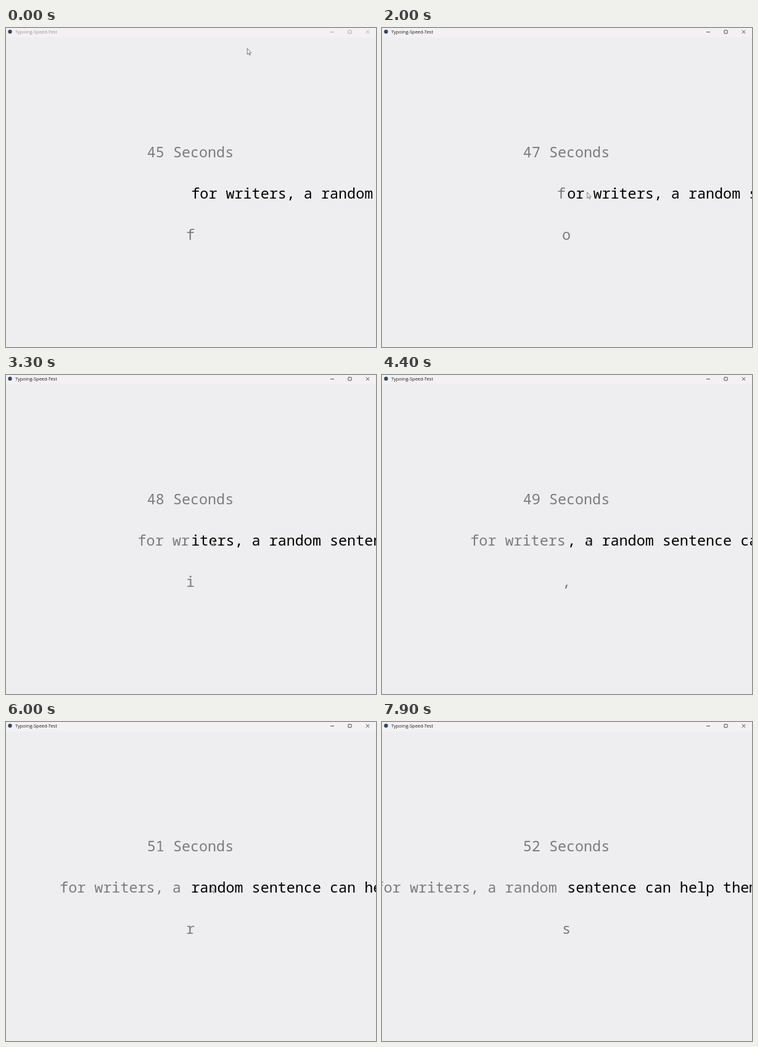
Write an HTML page that moves like this. It is 600 px wide and 518 px high and loops after 8000 ms.

```html
<!DOCTYPE html>
<html lang="en">
<head>
<meta charset="utf-8">
<title>Typing speed test</title>
<style>
  html, body { margin: 0; width: 100%; height: 100%; overflow: hidden; background: #eeedef; }
  svg { display: block; width: 100%; height: 100%; }
  .mono { font: 23.42px "Noto Sans Mono", "DejaVu Sans Mono", monospace; white-space: pre; fill: #7c7b7c; }
  .mono.todo { fill: #000; }
  .bar { font: 7.5px "Open Sans", "Noto Sans", sans-serif; }
</style>
</head>
<body>
<svg viewBox="0 0 600 518">
  <rect width="600" height="518" fill="#eeedef"/>
  <rect width="600" height="15.5" fill="#f3f1f4"/>
  <circle cx="6.5" cy="6" r="3.2" fill="#34485c"/>
  <g id="bar" class="bar">
    <text x="15" y="9.4" fill="currentColor">Typoing-Speed-Test</text>
    <g fill="none" stroke="currentColor" stroke-width=".8">
      <path d="M526 6.6h6M583.8 3.6l5.4 5.4M589.2 3.6l-5.4 5.4"/>
      <rect x="554.9" y="3.7" width="5.2" height="5.2" rx=".8"/>
    </g>
  </g>
  <text id="clock" class="mono" x="228.75" y="210"/>
  <text id="done" class="mono" y="277"/>
  <text id="todo" class="mono todo" x="300.3" y="277"/>
  <text id="key" class="mono" x="292" y="344"/>
  <path id="mouse" d="M0 0V9.6L2.2 7.6L3.6 10.9L5 10.3L3.6 7.1H6.4Z"
        fill="#fff" stroke="#3c3c3c" stroke-width=".7" stroke-linejoin="round"/>
</svg>
<script>
const LOOP = 8000, TICK = 100, ADVANCE = 14.052, DONE_END = 297.9;
const SENTENCE = "for writers, a random sentence can help them get";
// Moments at which a character is typed, in ms.
const KEYS = [2000, 2200, 2300, 2500, 3100, 3200, 3400, 3500, 3700, 3800, 4400,
              5200, 5300, 5400, 5600, 6100, 6200, 6400, 6500, 7500, 7700, 7900];
const $ = id => document.getElementById(id);
const bar = $("bar"), clock = $("clock"), done = $("done"),
      todo = $("todo"), key = $("key"), mouse = $("mouse");

const ease = p => p * p * (3 - 2 * p);
const ramp = (t, from, to) => ease(Math.min(1, Math.max(0, (t - from) / (to - from))));
const mix = (a, b, p) => a + (b - a) * p;

function draw(t) {
  const typed = KEYS.filter(k => k <= t).length;
  clock.textContent = 45 + Math.floor(t / 1000) + " Seconds";
  done.textContent = SENTENCE.slice(0, typed);
  done.setAttribute("x", DONE_END - typed * ADVANCE);
  todo.textContent = SENTENCE.slice(typed);
  key.textContent = SENTENCE[typed];

  const p = ramp(t, 700, 1300);
  mouse.setAttribute("transform", `translate(${mix(391.2, 332.8, p)} ${mix(33.2, 266.8, p)})`);
  bar.setAttribute("color", t < 1400 ? "#979598" : "#1c1c1c");
}

function loop() {
  const t = performance.now() % LOOP;
  draw(Math.floor(t / TICK) * TICK);
  requestAnimationFrame(loop);
}
loop();
</script>
</body>
</html>
```
